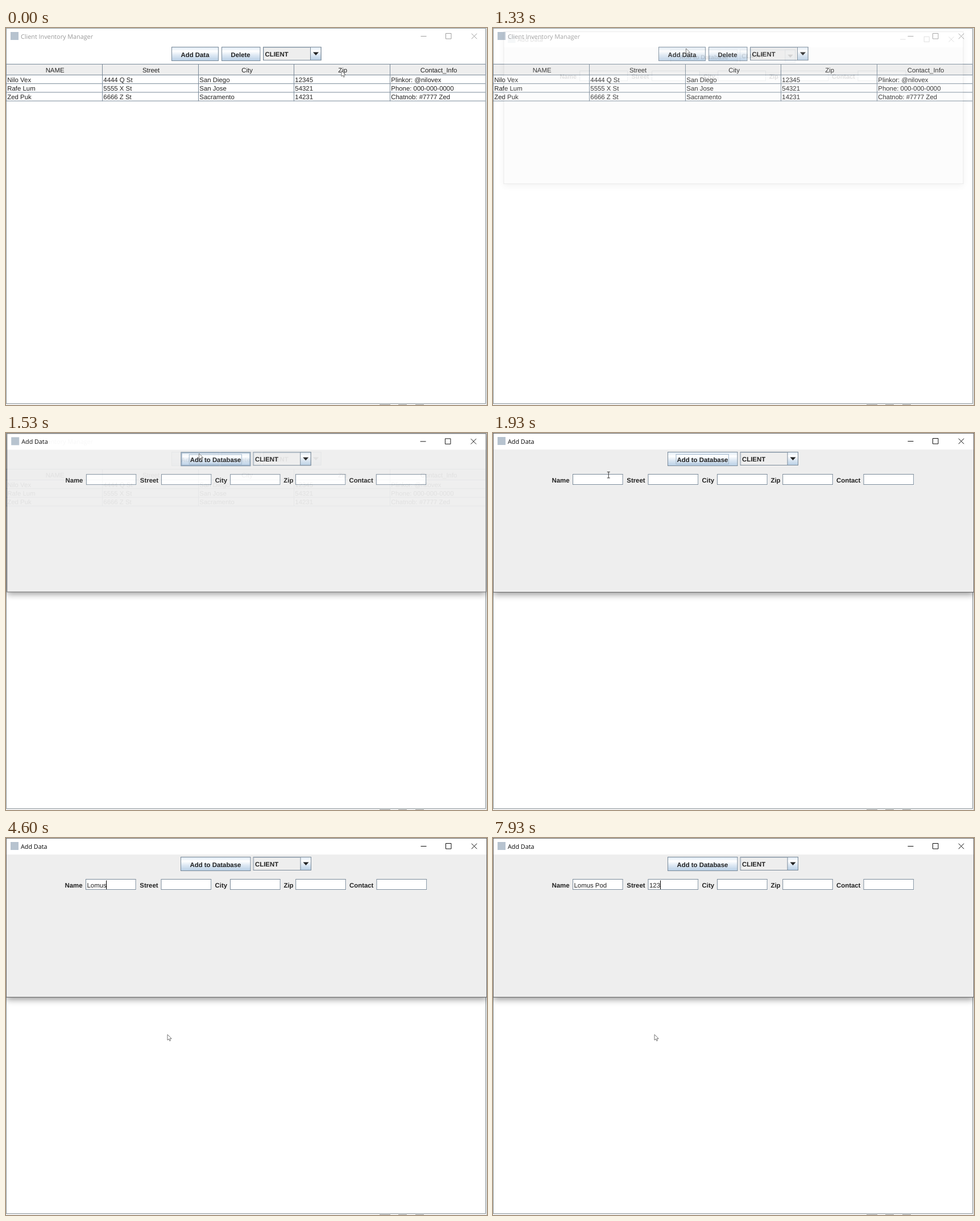
These frames come from a looping animation (846 by 662 pixels, 8000 ms). An HTML page:

```html
<!DOCTYPE html>
<html lang="en">
<head>
<meta charset="utf-8">
<title>Client Inventory Manager</title>
<style>
  html, body { margin: 0; width: 846px; height: 662px; overflow: hidden; background: #fff; }
  svg { display: block; }
  text { font: 11.4px "Liberation Sans", Arial, sans-serif; fill: #222; white-space: pre; text-rendering: geometricPrecision; }
  text.b { font-weight: bold; }
  text.title { font: 10.8px "Open Sans", "Noto Sans", sans-serif; fill: var(--ink); }
  .mid { text-anchor: middle; }
  .ctl { fill: none; stroke: var(--ink); stroke-width: .95; }
  .line { fill: none; stroke: #7a8a99; }
  .face { fill: url(#ocean); stroke: #7a8a99; }
  .down .face { fill: #b8cfe5; }
  .roll { fill: none; stroke: #8fa6bd; stroke-width: 1.4; visibility: hidden; }
  .hover .roll { visibility: visible; }
  .ring { fill: none; stroke: #a3b8cc; visibility: hidden; }
  .focus .ring { visibility: visible; }
  #main { --ink: #999; }
  #main.active { --ink: #000; }
  #main .frame { stroke: #8d979b; }
  #main.active .frame { stroke: #555; }
  #dialog { --ink: #000; }
  #shade { fill: #eee; filter: drop-shadow(0 4px 6px rgba(0, 0, 0, .42)); }
</style>
</head>
<body>
<svg id="stage" width="846" height="662" viewBox="0 0 846 662"></svg>
<script>
const LOOP = 8000, FPS = 15, BLINK = 472;
const $ = id => document.getElementById(id);

const rect = (x, y, w, h, attrs = '') =>
  `<rect x="${x}" y="${y}" width="${w}" height="${h}" ${attrs}/>`;
const path = (d, attrs) => `<path d="${d}" ${attrs}/>`;
const text = (x, y, s, cls = '', id = '') =>
  `<text x="${x}" y="${y}" class="${cls}" ${id && `id="${id}"`}>${s}</text>`;

const titleBar = name =>
  rect(8, 7, 14, 14, 'fill="#b7c3cf"') + text(26, 19, name, 'title') +
  path('M729.5 14.5H739.5M773.5 9.5H783V19H773.5ZM818.8 9.7L828.3 19.2M828.3 9.7L818.8 19.2', 'class="ctl"');

const button = (id, x, w, label) => `<g id="${id}">` +
  rect(x, 33.5, w, 24, 'class="face"') +
  rect(x + 1, 34.5, w - 2, 22, 'class="roll"') +
  rect(x + 14.5, 37.5, w - 30, 17, 'class="ring"') +
  text(x + 16, 51, label, 'b') + '</g>';

const combo = x =>
  rect(x, 33.5, 101.5, 23, 'fill="#eee" stroke="#7a8a99"') +
  path(`M${x + 1} 56V34.5H${x + 82}`, 'fill="none" stroke="#c4cdd6"') +
  rect(x + 83, 33.5, 18.5, 23, 'class="face"') +
  path(`M${x + 87.5} 42.5h10l-5 5.5Z`, 'fill="#222"') +
  text(x + 3, 49.5, 'CLIENT', 'b');

const field = (label, lx, x, id = '') =>
  text(lx, 87, label, 'b') +
  rect(x + 1, 73.5, 88, 18, 'fill="#fff"') +
  rect(x, 72.5, 87.7, 18, 'fill="#fff" stroke="#7a8a99"') +
  (id && text(x + 2, 87, '', '', id));

function table() {
  const rows = [
    ['NAME', 'Street', 'City', 'Zip', 'Contact_Info'],
    ['Nilo Vex', '4444 Q St', 'San Diego', '12345', 'Plinkor: @nilovex'],
    ['Rafe Lum', '5555 X St', 'San Jose', '54321', 'Phone: 000-000-0000'],
    ['Zed Puk', '6666 Z St', 'Sacramento', '14231', 'Chatnob: #7777 Zed'],
  ];
  let out = rect(0, 63.5, 843.5, 19, 'fill="#eee" class="line" style="fill:#eee"');
  rows.forEach((row, r) => {
    const y = 82.5 + r * 15.2;
    out += path(`M0 ${y}H843.5`, 'class="line"');
    row.forEach((s, c) => {
      const x = Math.round(c * 168.75) + .5;
      out += r ? text(x + 1.8, y - 2.9, s) : text(x + 85.6, 78.2, s, 'mid') + path(`M${x} 63.5V128.5`, 'class="line"');
    });
  });
  return out;
}

$('stage').innerHTML = `
  <defs><linearGradient id="ocean" x2="0" y2="1">
    <stop stop-color="#dde8f3"/><stop offset=".3" stop-color="#fff"/>
    <stop offset=".6" stop-color="#dde8f3"/><stop offset="1" stop-color="#b8cfe5"/>
  </linearGradient></defs>
  ${rect(0, 0, 846, 662, 'fill="#f4f4f4"')}
  ${path('M657 661.5H676M690 661.5H705M720 661.5H735', 'stroke="#999"')}
  ${path('M845.5 0V662', 'stroke="#c4c8ca"')}
  <g id="main">
    ${rect(.5, .5, 843, 659, 'class="frame" fill="#fff"')}
    ${titleBar('Client Inventory Manager')}
    ${button('add', 291.5, 82, 'Add Data')}
    ${button('del', 379.5, 67.5, 'Delete')}
    ${combo(452.5)}
    ${table()}
  </g>
  <g id="dialog">
    ${rect(.5, .5, 845, 279, 'id="shade"')}
    ${rect(.5, .5, 845, 28.5, 'fill="#fff"')}
    ${rect(.5, .5, 845, 279, 'fill="none" stroke="#666"')}
    ${titleBar('Add Data')}
    ${button('save', 307.5, 122.5, 'Add to Database')}
    ${combo(435)}
    ${field('Name', 103.5, 140.5, 'name')}
    ${field('Street', 235.3, 273, 'street')}
    ${field('City', 367.5, 394.5)}
    ${field('Zip', 488.5, 509.7)}
    ${field('Contact', 604, 652)}
    ${rect(0, 74.5, 1, 15.5, 'id="caret" fill="#000"')}
  </g>
  ${path('M0 0V10L2.3 7.9L3.9 11.4L5.5 10.7L4 7.3H7.2Z', 'id="arrow" fill="#fff" stroke="#555" stroke-width=".8"')}
  ${path('M-2.5 -5H2.5M0 -5V5.5M-2.5 5.5H2.5', 'id="beam" fill="none" stroke="#333"')}`;

const progress = (t, from, to) => Math.min(1, Math.max(0, (t - from) / (to - from)));
const easeOut = u => u * (2 - u);
const smooth = u => u * u * (3 - 2 * u);

// each stroke of the mouse bends towards a point and slows into its end
const HOME = [590, 75];
const strokes = [
  { from: 10, to: 400, bend: [525, 118], end: [446, 54] },
  { from: 535, to: 930, bend: [400, 58], end: [339.5, 36] },
  { from: 1600, to: 2070, bend: [250, 60], end: [194, 76] },
  { from: 2070, to: 2270, bend: [194, 78], end: [194, 81] },
  { from: 3000, to: 3600, bend: [385, 200], end: [284, 345] },
];

function pointerAt(t) {
  return strokes.reduce((p, s) => {
    const k = easeOut(progress(t, s.from, s.to)), m = 1 - k;
    return p.map((v, i) => m * m * v + 2 * m * k * s.bend[i] + k * k * s.end[i]);
  }, HOME);
}

const KEYS = 'Lomus Pod\t123', FOCUS = 2600;
const strikes = [4130, 4270, 4330, 4470, 4600, 4870, 5530, 5730, 6000, 6330, 7470, 7670, 7930];

const toggle = (id, cls, on) => $(id).classList.toggle(cls, on);
const show = (id, on) => $(id).setAttribute('visibility', on ? 'visible' : 'hidden');
const place = (id, x, y) => $(id).setAttribute('transform', `translate(${x} ${y})`);

function drawTyping(t) {
  const count = strikes.filter(s => s <= t).length;
  const [name, street] = KEYS.slice(0, count).split('\t');
  const tabbed = street !== undefined;
  $('name').textContent = name;
  $('street').textContent = street || '';

  const box = $(tabbed ? 'street' : 'name');
  const width = box.textContent ? box.getComputedTextLength() : 0;
  const idle = t - (count ? strikes[count - 1] : FOCUS);
  $('caret').setAttribute('x', Math.round((tabbed ? 275 : 142) + width - .4));
  $('caret').setAttribute('opacity', idle >= 0 && Math.floor(idle / BLINK) % 2 === 0 ? 1 : 0);
}

function draw(now) {
  const t = Math.floor((now + 3.4) * FPS / 1000) / FPS * 1000 + 3.4;
  const [x, y] = pointerAt(t);
  const over = (l, w) => x >= l && x <= l + w && y >= 33 && y <= 58;

  const pressed = t >= 1070 && t < 1130;
  toggle('main', 'active', pressed);
  toggle('add', 'down', pressed);
  toggle('add', 'hover', t < 1130 && over(291, 83));
  toggle('del', 'hover', t < 1130 && over(379, 68));
  toggle('save', 'hover', t >= 1400 && over(307, 123));
  toggle('save', 'focus', t >= 1400 && t < FOCUS);

  const open = smooth(progress(t, 1265, 1585));
  show('dialog', open > 0);
  $('dialog').setAttribute('opacity', open);
  $('dialog').setAttribute('transform', `translate(423 140) scale(${.95 + .05 * open}) translate(-423 -140)`);

  drawTyping(t);

  const beam = t >= 1930 && x > 141 && x < 228 && y > 72 && y < 91;
  show('beam', beam);
  show('arrow', !beam);
  place(beam ? 'beam' : 'arrow', x, y);
}

const start = performance.now();
function tick() {
  draw((performance.now() - start) % LOOP);
  requestAnimationFrame(tick);
}
tick();
</script>
</body>
</html>
```
